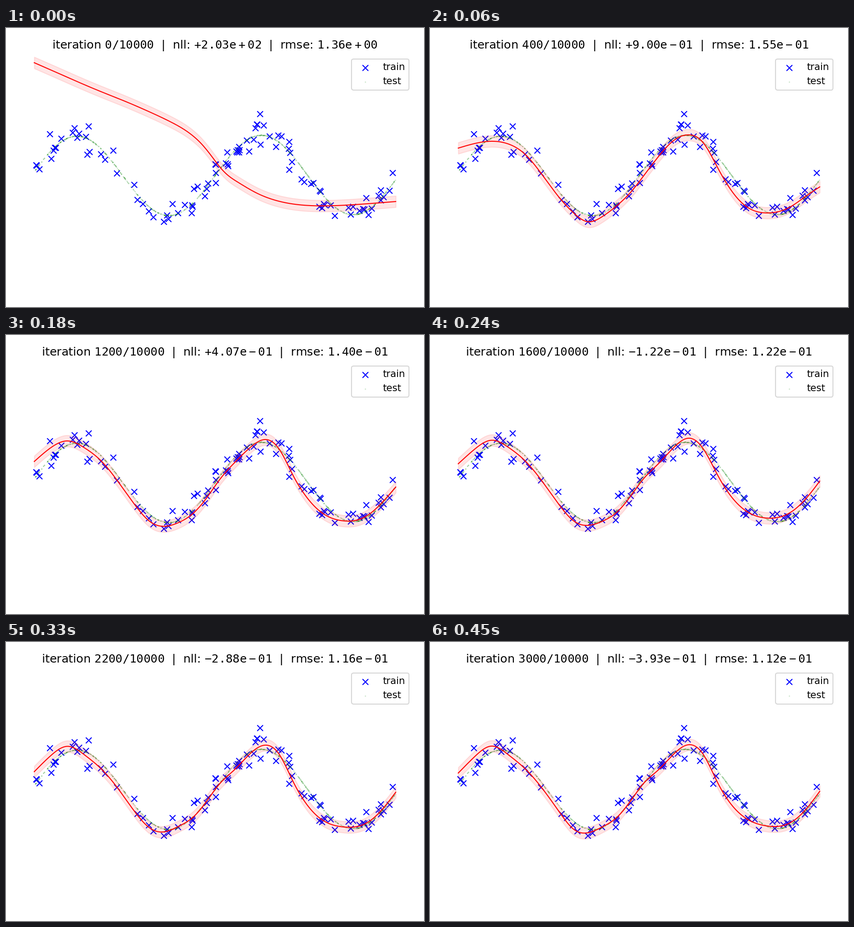
A matplotlib script that plays this animation: 917x611 px, repeating every 1.48 s.

```python
import numpy as np
import matplotlib.pyplot as plt
from matplotlib.animation import FuncAnimation

W, H, DPI = 917, 611, 128
PT = 152.8 / DPI          # size of one plot point on this canvas
LEFT, RIGHT = 62, 855     # horizontal span of the data
BAND = 12.5               # half height of the confidence band
STEP_ITERS, LAST_STEP = 200, 15
TICK_MS, LOOP_MS, STEP_MS = 10, 1480, 30

# Noisy observations, in stage pixels
TRAIN_LEFT = [
    (66, 300), (67, 301), (73, 309), (96, 232), (99, 286), (104, 268),
    (107, 262), (109, 262), (121, 242), (146, 229), (150, 219), (156, 240),
    (160, 231), (175, 238), (181, 215), (178, 277), (183, 271), (208, 276),
    (217, 288), (235, 268), (243, 318), (281, 343), (288, 376), (300, 385),
    (313, 401), (323, 414), (346, 424), (353, 410), (356, 418), (365, 385),
    (377, 405), (392, 387), (407, 405), (408, 388), (409, 391), (412, 352),
    (420, 347), (436, 368), (440, 352), (443, 340), (459, 298), (460, 299),
    (460, 317), (460, 339),
]
TRAIN_RIGHT = [
    (482, 296), (485, 272), (487, 302), (486, 298), (505, 270), (508, 267),
    (511, 260), (512, 267), (511, 272), (507, 272), (528, 246), (533, 270),
    (543, 244), (547, 219), (550, 211), (551, 211), (557, 188), (558, 255),
    (565, 213), (578, 237), (592, 260), (597, 235), (604, 237), (621, 249),
    (620, 264), (623, 273), (627, 293), (621, 310), (648, 331), (654, 337),
    (669, 341), (674, 339), (688, 356), (690, 358), (687, 391), (693, 394),
    (697, 385), (699, 387), (712, 388), (721, 411), (751, 393), (756, 408),
    (761, 391), (775, 400), (783, 396), (786, 397), (790, 372), (795, 409),
    (802, 395), (817, 367), (822, 355), (822, 377), (828, 370), (841, 356),
    (848, 317),
]

# Untrained prediction
START_X = [62, 110, 160, 210, 260, 310, 360, 400, 430, 455,
           470, 485, 510, 550, 590, 630, 690, 770, 855]
START_Y = [76, 97, 119, 140, 160, 181.5, 205, 228.5, 255, 286,
           305.5, 321, 338.5, 361.5, 377, 385.5, 389.5, 386.5, 380]

# Prediction at later checkpoints, on shared knots
KNOTS = [62, 98, 135, 172, 208, 245, 285, 315, 345, 378, 410, 440,
         470, 500, 535, 567, 600, 630, 655, 690, 740, 790, 825, 855]
FITS = [
    [263, 253, 248, 254, 276, 320, 373, 405, 424, 413, 389, 360,
     322, 283, 246, 234, 252, 304, 347, 388, 405, 392, 368, 348],
    [275, 251, 236.5, 249, 277, 321, 373, 405, 419, 411, 390, 356,
     317, 283, 248, 226.5, 251, 302, 344, 383, 402, 388, 358, 323],
    [277, 247, 232, 247, 275, 320, 375, 408, 419, 411, 391, 357,
     315, 281, 247, 229, 251, 308, 349, 387, 407, 397, 367, 333],
    [282, 250, 230.5, 246, 275, 319, 374, 407, 417, 408, 388, 353,
     313, 283, 246, 226, 250, 305, 346, 383, 401, 389, 358, 320],
    [284, 249, 228.5, 247, 277, 320, 375, 407, 416, 404, 384, 349,
     309, 281, 245, 226, 247, 306, 349, 387, 405, 397, 367, 329],
    [287, 251, 228, 247, 277, 319, 374, 410, 418, 405, 384, 348,
     308, 281, 245, 225, 247, 306, 348, 384, 403, 396, 366, 327],
]
CHECKPOINTS = [400, 800, 1200, 1600, 2200, 3000]
NLL = [0.900, 0.389, 0.407, -0.122, -0.288, -0.393]
RMSE = [0.155, 0.140, 0.140, 0.122, 0.116, 0.112]
NLL_START, RMSE_START = 203, 1.36


def spline(kx, ky, x):
    """Natural cubic spline through the knots."""
    kx, ky = np.asarray(kx, float) / 100, np.asarray(ky, float)
    x = x / 100
    n = len(kx)
    tail = np.column_stack([np.ones(n), kx])
    cubes = np.abs(kx[:, None] - kx) ** 3
    system = np.block([[cubes, tail], [tail.T, np.zeros((2, 2))]])
    coef = np.linalg.solve(system, np.append(ky, [0, 0]))
    return np.abs(x[:, None] - kx) ** 3 @ coef[:n] + coef[n] + coef[n + 1] * x


def truth(x):
    wave = np.cos(2 * np.pi * (x - 155) / 404.5)
    return 323.5 - 0.005 * (x - 256) - 87.5 * wave


grid = np.linspace(LEFT, RIGHT, 400)
start_curve = spline(START_X, START_Y, grid)
fit_curves = np.array([spline(KNOTS, fit, grid) for fit in FITS])


def state(it):
    """Curve, nll and rmse after a number of iterations."""
    if it < CHECKPOINTS[0]:
        u = 1 - (1 - it / CHECKPOINTS[0]) ** 2
        curve = start_curve + u * (fit_curves[0] - start_curve)
        return (curve, NLL_START ** (1 - u) * NLL[0] ** u,
                RMSE_START ** (1 - u) * RMSE[0] ** u)
    i = min(np.searchsorted(CHECKPOINTS, it, side="right"), len(FITS) - 1)
    a, b = CHECKPOINTS[i - 1], CHECKPOINTS[i]
    u = (it - a) / (b - a)
    return (fit_curves[i - 1] + u * (fit_curves[i] - fit_curves[i - 1]),
            np.interp(it, CHECKPOINTS, NLL), np.interp(it, CHECKPOINTS, RMSE))


def tt(text):
    return rf"$\mathtt{{{text}}}$"


plt.rcParams["font.family"] = "DejaVu Sans"
fig = plt.figure(figsize=(W / DPI, H / DPI), dpi=DPI, facecolor="white")
ax = fig.add_axes([0, 0, 1, 1])
ax.set(xlim=(0, W), ylim=(H, 0))
ax.axis("off")

train = np.array(TRAIN_LEFT + TRAIN_RIGHT)
ax.scatter(*train.T, s=36 * PT**2, marker="x", color="blue",
           linewidths=PT, label="train")
test_x = np.random.default_rng(4).uniform(LEFT, RIGHT, 800)
ax.scatter(test_x, truth(test_x), s=1.8 * PT**2, color="green", alpha=0.2,
           linewidths=0, label="test")

band = ax.fill_between(grid, start_curve - BAND, start_curve + BAND,
                       color="red", alpha=0.1, linewidth=PT)
line, = ax.plot(grid, start_curve, color="red", lw=PT)
title = ax.text(458.5, 44.8, "", fontsize=12 * PT, ha="center", va="baseline")

legend = ax.legend(loc="upper right", fontsize=10 * PT,
                   bbox_to_anchor=(894.6 / W, 1 - 57.4 / H))
legend.get_frame().set_linewidth(PT)


def update(frame):
    it = STEP_ITERS * min(frame * TICK_MS // STEP_MS, LAST_STEP)
    curve, nll, rmse = state(it)
    line.set_ydata(curve)
    outline = np.concatenate([np.column_stack([grid, curve - BAND]),
                              np.column_stack([grid, curve + BAND])[::-1]])
    band.set_verts([outline])
    title.set_text(f"iteration {tt(f'{it}/10000')}  |  "
                   f"nll: {tt(f'{nll:+.2e}')}  |  rmse: {tt(f'{rmse:.2e}')}")
    return line, band, title


anim = FuncAnimation(fig, update, frames=LOOP_MS // TICK_MS, interval=TICK_MS,
                     repeat=True, repeat_delay=0, blit=False)
plt.show()
```
